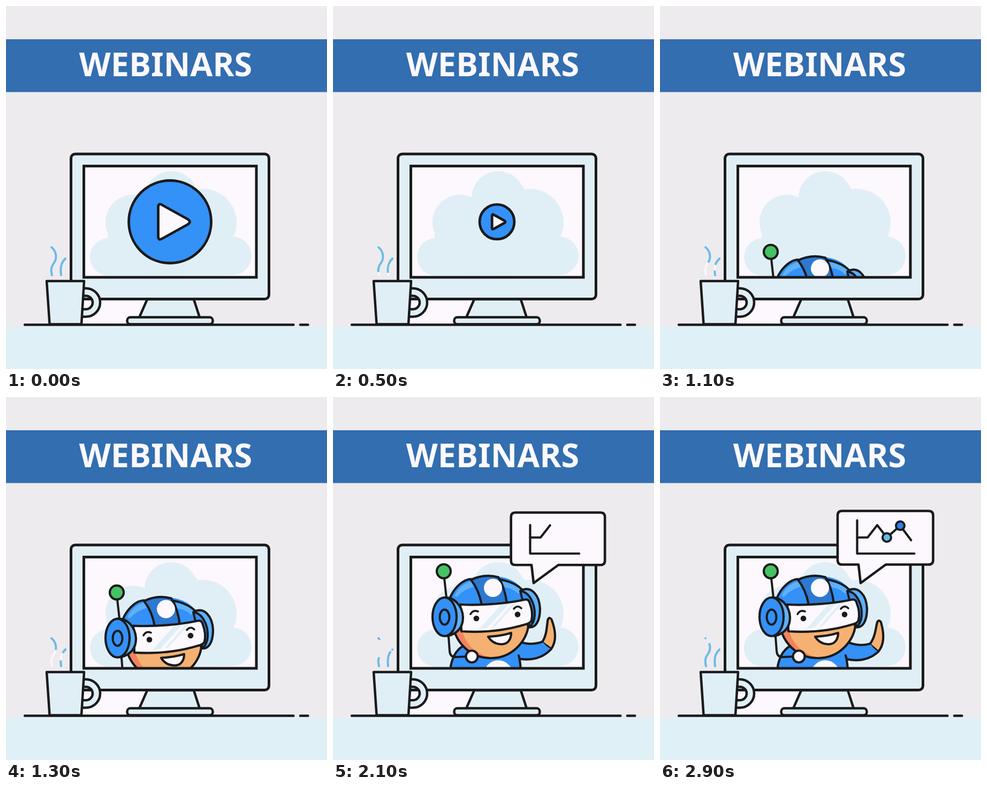
An HTML page with a canvas that plays this animation: 600x677 px, repeating every 3 s.

```html
<!DOCTYPE html>
<html lang="en">
<head>
<meta charset="utf-8">
<title>Webinars</title>
<style>
  html, body { margin: 0; width: 100%; height: 100%; overflow: hidden; background: #eeebee; }
  canvas { display: block; }
</style>
</head>
<body>
<canvas id="stage" width="600" height="677"></canvas>
<script>
const ctx = document.getElementById('stage').getContext('2d');
const LOOP = 3000, STEP = 100;
const INK = '#1a1a1c', PALE = '#e0eff6', WHITE = '#fcf8fd';
const BLUE = '#3391f8', DEEP = '#2c79d2', SKY = '#5fb0f6', STEAM = '#69bbe8';

const clamp = v => Math.max(0, Math.min(1, v));
const mix = (a, b, k) => a + (b - a) * k;
const span = (t, from, to) => clamp((t - from) / (to - from));

// Piecewise linear value from [time, value] pairs
function keyed(t, keys) {
  if (t <= keys[0][0]) return keys[0][1];
  for (let i = 1; i < keys.length; i++) {
    const [t0, v0] = keys[i - 1], [t1, v1] = keys[i];
    if (t <= t1) return mix(v0, v1, (t - t0) / (t1 - t0));
  }
  return keys[keys.length - 1][1];
}

function paint(path, fill, stroke, width = 4.5) {
  if (fill) { ctx.fillStyle = fill; ctx.fill(path); }
  if (stroke) { ctx.strokeStyle = stroke; ctx.lineWidth = width; ctx.stroke(path); }
}
const shape = (d, fill, stroke, width) => paint(new Path2D(d), fill, stroke, width);

function oval(x, y, rx, ry, fill, stroke, width) {
  const p = new Path2D();
  p.ellipse(x, y, rx, ry, 0, 0, Math.PI * 2);
  paint(p, fill, stroke, width);
}
const disc = (x, y, r, ...style) => oval(x, y, r, r, ...style);

function box(x, y, w, h, r, fill, stroke, width) {
  const p = new Path2D();
  p.roundRect(x, y, w, h, r);
  paint(p, fill, stroke, width);
}

// Strokes the part of a path between two distances along it
function trimmed(d, from, to, color, width) {
  if (to - from < 0.5) return;
  ctx.save();
  ctx.setLineDash([0, from, to - from, 999]);
  shape(d, null, color, width);
  ctx.restore();
}

function group(draw) { ctx.save(); draw(); ctx.restore(); }

function backdrop() {
  ctx.fillStyle = '#eeebee';
  ctx.fillRect(0, 0, 600, 677);
  ctx.fillStyle = '#326eb0';
  ctx.fillRect(0, 62, 600, 98.5);
  ctx.fillStyle = '#dff0f7';
  ctx.fillRect(0, 598, 600, 79);
  ctx.fillStyle = WHITE;
  ctx.font = 'bold 61px "Noto Sans", "Open Sans", sans-serif';
  ctx.textAlign = 'center';
  ctx.fillText('WEBINARS', 298.5, 131);
}

function monitor() {
  shape('M143 547 H264 L249 581 H227 V594 H143 Z', WHITE);
  shape('M264 547 L351 547 L362 581 H249 Z', PALE, INK);
  box(226.5, 580.5, 160, 13, 6, PALE, INK);
  box(121.5, 276, 370, 270.5, 8, PALE, INK, 5);
  box(145.5, 298.5, 322.5, 207.5, 0, WHITE);
}

function cloud(t) {
  const k = keyed(t, [[500, 0], [700, 1], [1000, 0]]);
  const lobe = (a, b) => a.map((v, i) => mix(v, b[i], k));
  const left = lobe([192, 468, 35], [178, 439, 7]);
  const right = lobe([423, 466, 36], [385, 458, 17]);
  const back = lobe([368, 404, 63], [335, 385, 35]);
  const side = lobe([429, 440], [401, 452]);
  disc(237, 403, 51, PALE);
  disc(309, 358, 50, PALE);
  for (const c of [left, right, back]) disc(...c, PALE);
  shape(`M${left[0]} ${left[1] + left[2]} L${right[0]} ${right[1] + right[2]}
    L${side} L355 337 L309 358 L237 403 L190 423 Z`, PALE);
}

function playButton(t) {
  const s = 1 - (t / 600) ** 3;
  if (s <= 0) return;
  const at = (x, y) => `${306.5 + x * s} ${402.5 + y * s}`;
  disc(306.5, 402.5, 77 * s, BLUE, INK, 4.8);
  shape(`M${at(-22, -27)} Q${at(-22, -36)} ${at(-14, -31)} L${at(33, -5)}
    Q${at(41, 0)} ${at(33, 5)} L${at(-14, 31)} Q${at(-22, 36)} ${at(-22, 27)} Z`, WHITE, INK, 4.8);
}

function arm(t) {
  const turn = keyed(t, [[1600, 68], [1700, 61], [1800, 30], [1900, 7], [2000, -4],
    [2100, -4.5], [2400, 0]]);
  ctx.translate(345, 475);
  ctx.rotate(turn * Math.PI / 180);
  ctx.translate(-345, -475);
  shape('M392 461 C402 449 403 432 406 420 Q409 414 413 420 C420 444 419 462 408 475 Z', '#f5b171', INK, 4.2);
  shape('M348 456 C365 463 380 464 393 460 Q398 469 408 475 C394 488 374 494 347 489 Z', BLUE);
  shape('M350 457 C365 463 380 464 393 460 M408 475 C394 488 374 494 349 489', null, INK, 4.2);
}

function head() {
  disc(295, 416, 71, '#f5b171');
  group(() => {
    const face = new Path2D();
    face.arc(295, 416, 71, 0, 7);
    ctx.clip(face);
    shape('M222 430 H240 C247 462 266 480 300 487 L280 492 L225 470 Z', '#f2835f');
  });
  disc(295, 416, 71, null, INK, 4.2);

  // Helmet
  shape('M214 392 C219 358 246 337 283 335 C330 330 362 350 367 392 Z', BLUE);
  shape('M227 371 C235 354 246 347 259 344 L263 354 C248 358 240 364 232 373 Z', SKY);
  shape('M317 344 C334 347 347 354 354 363 L346 367 C338 359 330 356 321 355 Z', SKY);
  shape('M258 341 Q283 329 309 336 Q322 357 325 386 L278 388 Q273 360 258 341 Z', DEEP, INK, 4.2);
  disc(299, 356, 17, WHITE);
  shape('M214 392 C219 358 246 337 260 340 M311 340 C339 345 357 356 365 377', null, INK, 4.2);

  // Far earphone
  shape('M351 361 C371 351 386 370 387 395 C387 419 378 432 365 429 Z', SKY, INK, 4.2);
  shape('M350 362 C366 363 378 384 377 407 Q376 422 367 429 Z', BLUE, INK, 4);

  // Visor
  const visor = 'M238 387 C280 389 325 385 358 378 Q366 376 368 385 C373 398 373 408 371 417 Q368 422 360 424 C324 435 285 440 240 437 Z';
  shape(visor, WHITE);
  group(() => {
    ctx.clip(new Path2D(visor));
    shape('M318 383 L334 380 L289 430 L273 433 Z M342 378 L348 378 L303 428 L297 429 Z', PALE);
  });
  shape(visor, null, INK, 4.2);
  disc(268, 413, 5.3, INK);
  disc(345, 405.5, 5.3, INK);
  shape('M257 405 Q262 396 271 400 M338 395 Q345 387 352 394', null, INK, 3.6);
  shape('M290 447 Q313 446 333 440 C333 454 325 462 313 461 Q298 460 290 447 Z', WHITE, INK, 4.2);

  // Near earphone
  shape('M207 374 C226 372 242 389 243 411 C243 430 233 441 214 446 Z', SKY, INK, 4.2);
  oval(208.5, 410, 22.5, 36, BLUE, INK, 4.2);
  oval(208.5, 410.5, 9, 14, BLUE, INK, 4);
}

function presenter(t) {
  if (t < 1000) return;
  ctx.translate(0, 212 * (1 - span(t, 1000, 1700)) ** 3);
  shape('M208 338 L212 374', null, INK, 4);
  disc(207, 325, 13, '#45c262', INK, 4.2);
  group(() => arm(t));
  shape('M219 510 C221 490 228 474 242 465 L352 456 L347 482 L351 510 Z', BLUE);
  disc(309, 518, 27, WHITE);
  shape('M219 510 C221 490 228 474 242 465 M347 482 Q350 492 351 510', null, INK, 4.2);
  head();
  shape('M216 447 L218 474 Q219 485 229 485 L250 484', null, INK, 4);
  disc(259.5, 484, 11, WHITE, INK, 4.2);
}

function screen(t) {
  group(() => {
    ctx.beginPath();
    ctx.rect(146, 299, 321, 206);
    ctx.clip();
    cloud(t);
    playButton(t);
    presenter(t);
  });
  ctx.lineJoin = 'miter';
  box(145.5, 298.5, 322.5, 207.5, 0, null, INK, 5);
  ctx.lineJoin = 'round';
}

function bubble(t) {
  // Height trails width slightly while the bubble grows out of its tail
  const grow = begin => 1 - Math.exp(-Math.max(0, t - begin) / 165);
  const sx = grow(1425), sy = grow(1470);
  if (!sy) return;
  const at = (x, y) => `${375 + (x - 375) * sx} ${347 + (y - 347) * sy}`;
  shape(`M${at(340, 212.5)} L${at(502, 212.5)} Q${at(510.5, 212.5)} ${at(510.5, 221)}
    L${at(510.5, 304)} Q${at(510.5, 312.5)} ${at(502, 312.5)} L${at(422, 312.5)} L${at(375, 347)}
    L${at(371, 312.5)} L${at(340, 312.5)} Q${at(332, 312.5)} ${at(332, 304)}
    L${at(332, 221)} Q${at(332, 212.5)} ${at(340, 212.5)} Z`, WHITE, INK, 4.6);
}

function chart(t) {
  const axis = span(t, 1800, 2150);
  if (axis) shape(`M368.5 ${292 - 62 * axis} V292 H${368.5 + 107 * axis}`, null, INK, 4.2);
  trimmed('M368.5 262 H388 L406 239 L424 262 L449 240 L470 268', 0, 145 * span(t, 1900, 2500), INK, 4.2);
  const dot = (x, y, color, start) => {
    const k = span(t, start, start + 150);
    if (k) disc(x, y, 8 * k, color, INK, 4);
  };
  dot(424, 262, '#62bdf0', 2250);
  dot(449, 240, '#2f80ea', 2380);
}

function steam(t) {
  const wisp = (d, length, old, fresh) => {
    const kept = length * keyed(t, old), grown = length * keyed(t, fresh);
    if (t > 300 && t < 1500) trimmed(d, kept, length, WHITE, 3.4);
    trimmed(d, 0, kept, STEAM, 4);
    trimmed(d, length - grown, length, STEAM, 4);
  };
  wisp('M85 450 C93 456 96 468 91 477 C85 486 83 490 86 502', 57,
    [[0, 1], [400, 0.9], [700, 0.78], [1300, 0.4], [1700, 0.25], [2100, 0.04], [2200, 0]],
    [[1600, 0], [1700, 0.03], [2100, 0.28], [2900, 0.77]]);
  wisp('M111 471 C103 479 101 487 103 502', 33.5,
    [[0, 1], [400, 0.88], [700, 0.72], [1300, 0.2], [1600, 0]],
    [[600, 0], [700, 0.05], [1300, 0.28], [1700, 0.5], [2100, 0.82], [2500, 1]]);
}

function desk(t) {
  shape('M35 594.5 H537.5 M550 594.5 H564.5', null, INK, 4.4);
  const handle = 'M144 533.5 H149 A20 19.5 0 0 1 149 572.5 H143';
  shape(handle, null, INK, 18.5);
  shape(handle, null, PALE, 9.5);
  shape('M76 513 H146 L141 593.5 H81.5 Z', PALE, INK);
  steam(t);
}

function render(t) {
  ctx.lineCap = ctx.lineJoin = 'round';
  backdrop();
  monitor();
  screen(t);
  desk(t);
  bubble(t);
  chart(t);
}

let start;
function tick(now) {
  start ??= now;
  render(Math.floor(((now - start) % LOOP) / STEP) * STEP);
  requestAnimationFrame(tick);
}
render(0);
requestAnimationFrame(tick);
</script>
</body>
</html>
```
